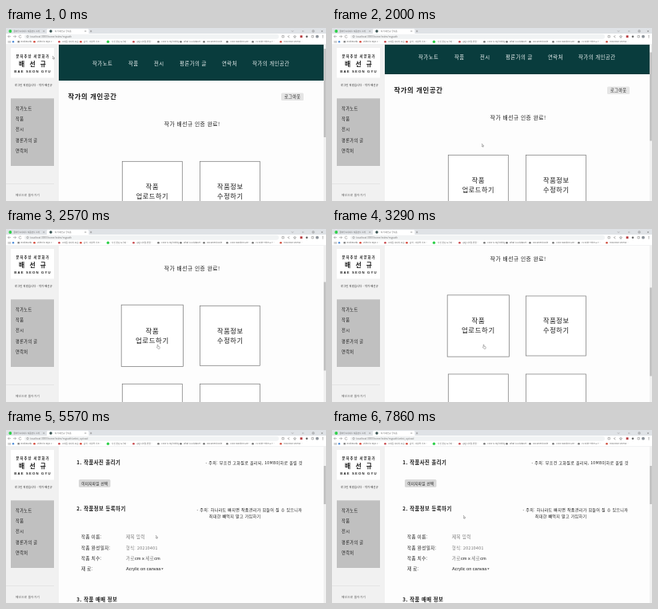
An HTML page that plays this animation: 400 px wide and 217 px high, repeating every 8 s.

```html
<!DOCTYPE html>
<html lang="ko">
<head>
<meta charset="utf-8">
<title>작가의 개인공간</title>
<style>
html, body { margin: 0; width: 100%; height: 100%; overflow: hidden; background: #fff; }
svg { display: block; width: 100%; height: 100%; }
text { font-family: "Noto Sans CJK KR", "Noto Sans CJK", sans-serif; fill: #1c1c1c; white-space: pre; letter-spacing: .07em; }
.b { font-weight: 700; }
.m { font-weight: 500; }
.mid { text-anchor: middle; }
.latin { font-family: "Liberation Sans", sans-serif; letter-spacing: 0; }
.nav text { font-size: 6.4px; fill: #eef4f4; }
.side text { font-size: 5.2px; }
.side .sub { font-size: 4.3px; letter-spacing: 1px; }
.side .name { font-size: 7.8px; letter-spacing: 2px; }
.side .roman { font-size: 4.3px; letter-spacing: 1.15px; }
.side .login { font-size: 3.2px; }
.side .back { font-size: 3.65px; fill: #555; }
.card text { font-size: 8.2px; text-anchor: middle; }
.card rect { fill: #fff; stroke: #777; stroke-width: .7; }
.head text { font-size: 6.35px; font-weight: 700; }
.note text { font-size: 5px; }
.form text { font-size: 5.5px; }
.form .date { font-size: 5.2px; }
.form .latin { font-size: 5.6px; }
.marks text, .tabs text { font-size: 2.6px; letter-spacing: 0; fill: #666; }
.url { font-size: 3.1px; letter-spacing: 0; fill: #777; }
.form .grey { fill: #777; }
.icon { fill: none; stroke: #777; stroke-width: .5; }

.anim { animation: 8s step-end infinite; }
#home { animation-name: scroll; }
#thumb { animation-name: thumb; }
.first { animation: leave 8s step-end infinite; }
.second { animation: enter 8s step-end infinite; }
#hover { animation-name: hover; transform-origin: 182.6px 204.5px; }
#cursor { animation-name: move; }
#arrow { animation-name: arrow; }
#hand { animation-name: hand; }

@keyframes scroll {
  0% { transform: translateY(0); }
  25% { transform: translateY(-8px); }
  26.75% { transform: translateY(-35px); }
  28.625% { transform: translateY(-62.5px); }
  32.125% { transform: translateY(-71px); }
  33.875% { transform: translateY(-80px); }
  35.75%, 100% { transform: translateY(-83.3px); }
}
@keyframes thumb {
  0% { transform: translateY(0); }
  25% { transform: translateY(4.5px); }
  26.75% { transform: translateY(20px); }
  28.625% { transform: translateY(35.5px); }
  32.125% { transform: translateY(40.5px); }
  33.875% { transform: translateY(45.5px); }
  35.75%, 100% { transform: translateY(47.5px); }
}
@keyframes leave { 0% { visibility: visible; } 44.625%, 100% { visibility: hidden; } }
@keyframes enter { 0% { visibility: hidden; } 44.625%, 100% { visibility: visible; } }
@keyframes hover {
  0% { transform: scale(1); }
  28.625% { transform: scale(1.02); }
  32.125%, 100% { transform: scale(1.03); }
}
@keyframes arrow {
  0% { visibility: visible; }
  28.625% { visibility: hidden; }
  44.625%, 100% { visibility: visible; }
}
@keyframes hand {
  0% { visibility: hidden; }
  28.625% { visibility: visible; }
  44.625%, 100% { visibility: hidden; }
}
@keyframes move {
  0% { transform: translate(58px, 35px); }
  1.75% { transform: translate(62px, 52px); }
  3.5% { transform: translate(70px, 75px); }
  5.375% { transform: translate(80px, 98px); }
  7.125% { transform: translate(88px, 115px); }
  16.125% { transform: translate(134px, 135px); }
  19.625% { transform: translate(160px, 141px); }
  21.375% { transform: translate(187px, 145px); }
  28.625% { transform: translate(189px, 145px); }
  46.375% { transform: translate(190px, 142px); }
  48.25% { transform: translate(192px, 137px); }
  50% { transform: translate(193px, 133px); }
  51.75% { transform: translate(193px, 130px); }
  62.5% { transform: translate(190px, 131px); }
  69.625% { transform: translate(187px, 132px); }
  71.375% { transform: translate(158px, 108px); }
  73.25% { transform: translate(145px, 95px); }
  75% { transform: translate(130px, 79px); }
  78.625% { transform: translate(124px, 77px); }
  80.375% { transform: translate(118px, 75px); }
  82.125% { transform: translate(114px, 76px); }
  83.875% { transform: translate(113px, 75px); }
  85.75% { transform: translate(112px, 74px); }
  91.125% { transform: translate(130px, 86px); }
  92.875% { transform: translate(150px, 99px); }
  94.625%, 100% { transform: translate(164px, 107px); }
}
</style>
</head>
<body>
<svg viewBox="0 0 400 217" preserveAspectRatio="none">
  <rect width="400" height="217" fill="#fdfdfd"/>

  <g class="first"><g id="home" class="anim">
    <rect x="66" y="20" width="331" height="46" fill="#093c3d"/>
    <g class="nav">
      <text x="108" y="46.5">작가노트</text>
      <text x="153" y="46.5">작품</text>
      <text x="185" y="46.5">전시</text>
      <text x="217" y="46.5">평론가의 글</text>
      <text x="270" y="46.5">연락처</text>
      <text x="308" y="46.5">작가의 개인공간</text>
    </g>
    <text class="b" x="77.5" y="89.1" font-size="8.4">작가의 개인공간</text>
    <rect x="344" y="81.5" width="28" height="9.5" rx="1.5" fill="#e5e5e5"/>
    <text class="mid" x="358.2" y="88.3" font-size="5.2">로그아웃</text>
    <text x="197.8" y="123.4" font-size="6.75">작가 배선규 인증 완료!</text>
    <g id="hover" class="anim card">
      <rect x="145.3" y="167.3" width="75" height="75"/>
      <text x="182.9" y="201.8">작품</text>
      <text x="182.9" y="213.5">업로드하기</text>
    </g>
    <g class="card">
      <rect x="242.5" y="167.3" width="75" height="75"/>
      <text x="280.3" y="201.8">작품정보</text>
      <text x="280.3" y="213.5">수정하기</text>
      <rect x="145.3" y="265.3" width="75" height="75"/>
      <rect x="242.5" y="265.3" width="75" height="75"/>
    </g>
  </g></g>

  <g class="second">
    <g class="head">
      <text x="88.3" y="42.6">1. 작품사진 올리기</text>
      <text x="88.3" y="101.2">2. 작품정보 등록하기</text>
      <text x="88.3" y="215.3">3. 작품 매매 정보</text>
    </g>
    <g class="note">
      <text x="249.5" y="42.8">- 주의: 무조건 고화질로 올리되, 10MB이하로 올릴 것</text>
      <text x="238.5" y="102">- 주의: 하나라도 빠지면 작품관리가 힘들어 질 수 있으니까</text>
      <text x="253.8" y="110.1">최대한 빼먹지 말고 가입하기</text>
    </g>
    <rect x="91" y="62" width="39.5" height="9.7" rx="1.5" fill="#d8d8d8"/>
    <text class="mid" x="110.9" y="68.5" font-size="4.6">이미지파일 선택</text>
    <g class="form">
      <text class="m" x="94" y="136.3">작품 이름:</text>
      <text class="m" x="94" y="149.5">작품 완성일자:</text>
      <text class="m" x="94" y="163">작품 치수:</text>
      <text class="m" x="94" y="176.3">재 료:</text>
      <text class="grey" x="150" y="136.3">제목 입력</text>
      <text class="grey date" x="150" y="149.5">형식: 20210401</text>
      <text x="150" y="163"><tspan class="grey">가로</tspan><tspan class="latin">cm x </tspan><tspan class="grey">세로</tspan><tspan class="latin">cm</tspan></text>
      <text class="latin" x="150" y="176">Acrylic on canvas</text>
      <path d="M194.2 173.6h2.4l-1.2 1.4z" fill="#222"/>
    </g>
  </g>

  <g class="side">
    <rect y="20" width="66" height="197" fill="#f1f1f1"/>
    <rect x="6" y="25" width="54" height="37.5" fill="#fff"/>
    <text class="b mid sub" x="33.5" y="37.2">문자추상 서양화가</text>
    <text class="b mid name" x="34" y="47.6">배 선 규</text>
    <text class="b mid latin roman" x="33.5" y="56">BAE SEON GYU</text>
    <text class="login" x="11" y="73.3">로그인 되었습니다 - 작가 배선규</text>
    <rect x="6" y="88.3" width="54" height="84.7" fill="#c0c0c0"/>
    <text x="12" y="102.6">작가노트</text>
    <text x="12" y="115.9">작품</text>
    <text x="12" y="129.2">전시</text>
    <text x="12" y="142.5">평론가의 글</text>
    <text x="12" y="155.9">연락처</text>
    <path d="M0 195.5h60" stroke="#dcdcdc" stroke-width=".6"/>
    <text class="back" x="12" y="210.5">메인으로 돌아가기</text>
  </g>

  <rect x="397" y="20" width="3" height="197" fill="#f1f1f1"/>
  <g class="first"><rect id="thumb" class="anim" x="397.3" y="26" width="2.5" height="111" fill="#bdbdbd"/></g>
  <rect class="second" x="397.3" y="45" width="2.5" height="48" fill="#bdbdbd"/>

  <g>
    <rect width="400" height="7" fill="#dfe2e6"/>
    <path d="M51 7V2.5Q51 1 52.5 1H102Q103.5 1 103.5 2.5V7z" fill="#fff"/>
    <g class="tabs">
      <circle cx="5.3" cy="4" r="1.9" fill="#2fd04a"/>
      <text x="9.5" y="5">클라우드서비스 작품전시 소개</text>
      <circle cx="56" cy="4" r="1.7" fill="#34504f"/>
      <text x="61" y="5">작가 배선규 공식홈</text>
    </g>
    <path class="icon" d="M46.5 3.2l1.6 1.6m0-1.6l-1.6 1.6M98.5 3.2l1.6 1.6m0-1.6l-1.6 1.6M105 4h2.4m-1.2-1.2v2.4"/>
    <path class="icon" d="M357 3.4l1.1 1.1 1.1-1.1M370 4h2.4M383 2.9h2.1V5H383zM394 2.9l2.2 2.2m0-2.2L394 5.1"/>

    <rect y="7" width="400" height="13.8" fill="#fff"/>
    <rect x="23" y="7.7" width="318" height="6" rx="3" fill="#f1f3f4"/>
    <path class="icon" d="M6 10.7H2.5l1.5-1.5m-1.5 1.5L4 12.2M9 10.7h3.5L11 9.2m1.5 1.5L11 12.2M19 9.8a1.6 1.6 0 1 0 .2 1.4"/>
    <circle class="icon" cx="27" cy="10.7" r="1.2"/>
    <text class="url first" x="30" y="11.8">localhost:3000/home/index/mypath</text>
    <text class="url second" x="30" y="11.8">localhost:3000/home/index/mypath/artist_upload</text>
    <path class="icon" d="M345 9.5h2.4v2.4H345zM354.5 9.3l-2.4 1.4 2.4 1.4M361 9.2l.5 1.1 1.1.1-.8.8.2 1.1-1-.6-1 .6.2-1.1-.8-.8 1.1-.1zM382 9.5h2.4v2.4H382z"/>
    <rect x="367.7" y="9.3" width="2.8" height="2.8" fill="#b5383c"/>
    <circle cx="376" cy="10.7" r="1.3" fill="#666"/>
    <circle cx="389" cy="10.7" r="1.9" fill="#8c9299"/>
    <path d="M396 9.2v.8m0 .4v.8m0 .4v.8" stroke="#666" stroke-width=".8"/>

    <g class="marks">
      <path d="M3 16v2.6m1.2-2.6v2.6m1.2-2.6v2.6" stroke="#888" stroke-width=".7" stroke-dasharray=".7 .25"/>
      <circle cx="9" cy="17.2" r="1.2" fill="#4c8bd8"/>
      <rect x="14.5" y="16" width="2.4" height="2.4" fill="#888"/>
      <text x="18.5" y="18.2">Bookmarks</text>
      <circle cx="35.5" cy="17.2" r="1.3" fill="#d64a3c"/>
      <text x="39" y="18.2">Video to mp3 c…</text>
      <circle cx="66.5" cy="17.2" r="1.3" fill="#c8474c"/>
      <text x="70" y="18.2">고화질 이미지 모음…</text>
      <circle cx="93.5" cy="17.2" r="1.3" fill="#d64a3c"/>
      <text x="97" y="18.2">음악 - 화성학 기초…</text>
      <circle cx="127.5" cy="17.2" r="1.7" fill="#2fd04a"/>
      <text x="132" y="18.2">사진 편집 도우미…</text>
      <circle cx="159.5" cy="17.2" r="1.3" fill="#c8474c"/>
      <text x="163" y="18.2">Jpg 디지털 변환…</text>
      <circle cx="190.5" cy="17.2" r="1.3" fill="#777"/>
      <text x="194" y="18.2">Color is my hobby…</text>
      <circle cx="218.5" cy="17.2" r="1.3" fill="#777"/>
      <text x="222" y="18.2">What is a dataset…</text>
      <circle cx="247.5" cy="17.2" r="1.3" fill="#777"/>
      <text x="251" y="18.2">Document Note</text>
      <circle cx="276.5" cy="17.2" r="1.3" fill="#777"/>
      <text x="280" y="18.2">Color Random Gen…</text>
      <circle cx="308.5" cy="17.2" r="1.3" fill="#777"/>
      <text x="312" y="18.2">CV Slide Filter &amp; T…</text>
      <circle cx="343.5" cy="17.2" r="1.3" fill="#d05040"/>
      <text x="347" y="18.2">How Bear several…</text>
    </g>
    <path d="M0 20.6h400" stroke="#dcdee0" stroke-width=".4"/>
  </g>

  <g id="cursor" class="anim" fill="#fff" stroke="#555" stroke-width=".4" stroke-linejoin="round">
    <path id="arrow" class="anim" d="M.2.2V3.6l.8-.7.6 1.4.7-.3-.6-1.3h1.1z"/>
    <path id="hand" class="anim" d="M.2.2q.5-.4.8 0v2l2 .5q.4.2.3.8L3 5.2H.9L-.7 3.4q0-.6.9-.1z"/>
  </g>
</svg>
</body>
</html>
```
